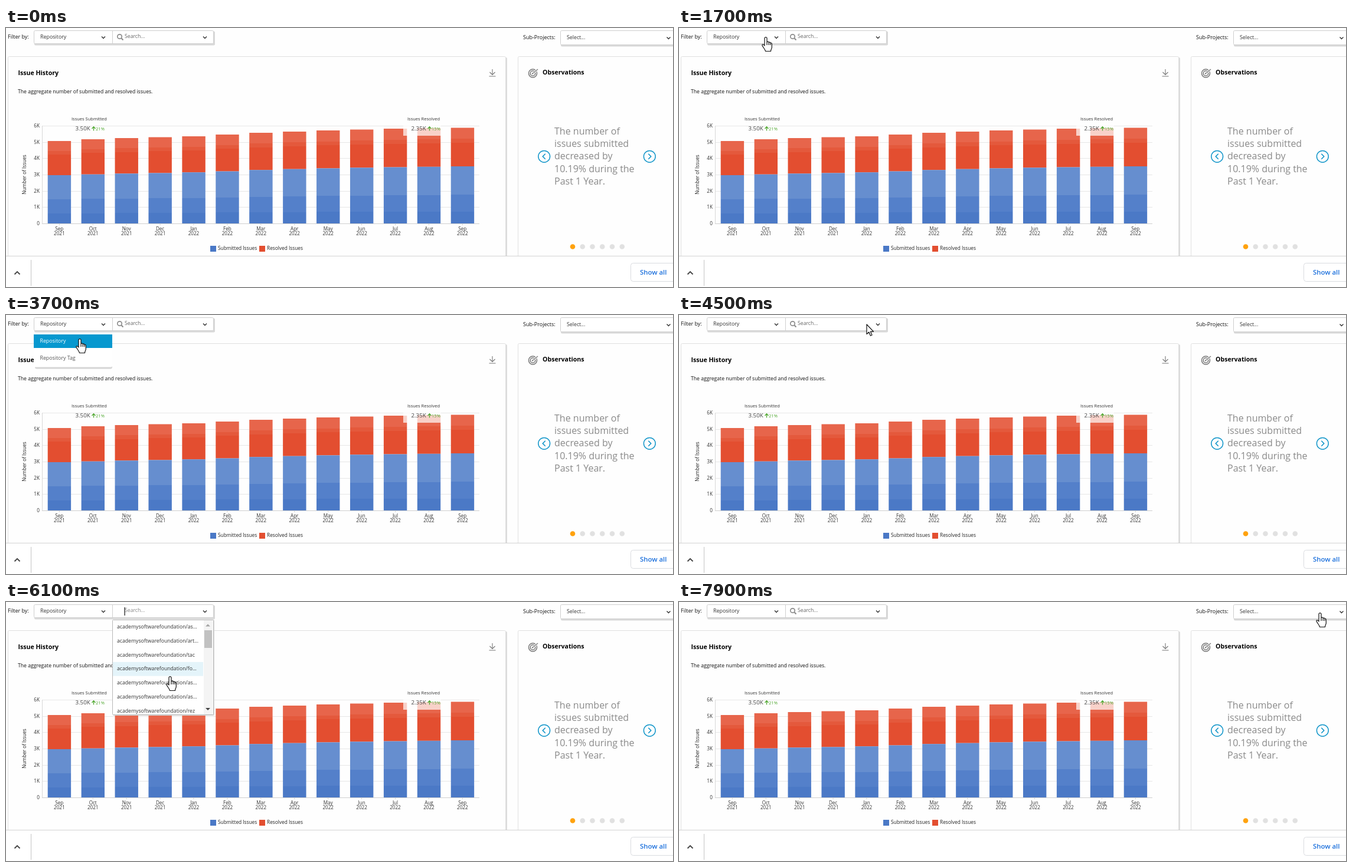
Write an HTML page that moves like this. It is 1130 px wide and 440 px high and loops after 8000 ms.

```html
<!DOCTYPE html>
<html lang="en">
<head>
<meta charset="utf-8">
<title>Issue history dashboard</title>
<style>
  html, body { margin: 0; width: 100%; height: 100%; overflow: hidden; background: #fefefe; }
  svg { display: block; width: 1130px; height: 440px; font-family: "Open Sans", "Noto Sans", sans-serif; }
  text { white-space: pre; }
</style>
</head>
<body>
<svg id="stage" viewBox="0 0 1130 440" xmlns="http://www.w3.org/2000/svg">
  <defs>
    <linearGradient id="red" x1="0" y1="0" x2="0" y2="1">
      <stop offset=".29" stop-color="#e7654b"/><stop offset=".29" stop-color="#e4593c"/>
      <stop offset=".39" stop-color="#e4593c"/><stop offset=".39" stop-color="#e34e30"/>
    </linearGradient>
    <linearGradient id="blue" x1="0" y1="0" x2="0" y2="1">
      <stop offset=".5" stop-color="#668ecf"/><stop offset=".5" stop-color="#5480ca"/>
      <stop offset=".79" stop-color="#5480ca"/><stop offset=".79" stop-color="#4b79c6"/>
    </linearGradient>
    <clipPath id="listClip"><rect x="181" y="31" width="170" height="159"/></clipPath>
  </defs>
</svg>
<script>
const NS = 'http://www.w3.org/2000/svg';
const stage = document.getElementById('stage');

function add(tag, attrs, parent = stage) {
  const el = document.createElementNS(NS, tag);
  for (const k in attrs) el.setAttribute(k, attrs[k]);
  parent.appendChild(el);
  return el;
}
const rect = (x, y, width, height, fill, more = {}, parent) =>
  add('rect', { x, y, width, height, fill, ...more }, parent);
const line = (d, stroke, width = 1, parent) =>
  add('path', { d, stroke, 'stroke-width': width, fill: 'none' }, parent);
const dot = (cx, cy, r, fill, more = {}, parent) => add('circle', { cx, cy, r, fill, ...more }, parent);
function label(str, x, y, size, fill, more = {}, parent) {
  const el = add('text', { x, y, 'font-size': size, fill, ...more }, parent);
  el.textContent = str;
  return el;
}
const chevron = (x, y, parent) => line(`M${x - 3} ${y - 1.5}l3 3 3-3`, '#333', 1.4, parent);
const show = (el, on) => el.setAttribute('display', on ? 'inline' : 'none');

function box(x, y, w, h) {
  rect(x + 1, y + 1.5, w + 1, h + 1, '#d9d9d9', { rx: 2 });
  rect(x + .5, y + .5, w - 1, h - 1, '#fff', { rx: 2, stroke: '#cfcfcf' });
}

// Cards
for (const [x, w] of [[3, 844], [867, 280]]) {
  rect(x + 2, 50, w, 360, '#dcdcdc', { rx: 2 });
  rect(x + .5, 48.5, w - 1, 360, '#fefefe', { rx: 2, stroke: '#e0e0e0' });
}

// Filter row
label('Filter by:', 3, 18, 9, '#111', { 'font-weight': 500 });
box(47, 4, 305, 23);
line('M180.5 5V27', '#cfcfcf');
label('Repository', 58, 18, 8.9, '#333');
chevron(165, 16);
chevron(337, 16);
const lens = add('g', {});
dot(192.5, 14.5, 3.7, 'none', { stroke: '#8c8c8c', 'stroke-width': 1.7 }, lens);
line('M195.3 17.3L198.5 20.5', '#8c8c8c', 2, lens);
const hint = label('Search...', 201, 17, 8.7, '#666');
label('Sub-Projects:', 876, 19, 9, '#111', { 'font-weight': 500 });
box(939, 4, 205, 25);
label('Select...', 950, 19, 8.8, '#333');
chevron(1122.5, 17);

// Card headings
label('Issue History', 20.5, 80, 10.6, '#000', { 'font-weight': 700 });
label('The aggregate number of submitted and resolved issues.', 20, 111, 8.65, '#111');
line('M824 70V79M819.5 75l4.5 4.5 4.5-4.5M818.5 82H829.5', '#777', 1.1);
label('Observations', 909, 79, 10.6, '#000', { 'font-weight': 700 });
for (const r of [7, 4.2]) dot(892.5, 77, r, 'none', { stroke: '#777', 'stroke-width': 1.5 });
dot(892.5, 77, 1.6, '#777');
line('M892.5 77L901 70', '#fefefe', 3);
line('M892.5 77L901 70', '#777', 1.3);

// Chart
const BASE = 332, STEP = 27.7;
for (let i = 0; i <= 6; i++) {
  const y = BASE - i * STEP;
  line(`M61 ${Math.round(y) + .5}H802`, i ? '#e7e7e7' : '#cfcfcf');
  label(i ? i + 'K' : '0', 57, y + 3, 8.2, '#333', { 'text-anchor': 'end' });
}
line('M61.5 166V332', '#d8d8d8');
label('Number of Issues', 0, 0, 8.2, '#222', {
  transform: 'translate(33.5 249) rotate(-90)', 'text-anchor': 'middle', 'font-weight': 500 });

const months = 'Sep Oct Nov Dec Jan Feb Mar Apr May Jun Jul Aug Sep'.split(' ');
const tops = [192, 189, 187, 185.5, 184, 181, 178, 176, 174, 172.5, 171, 170, 169.5];
const mids = [250, 248.7, 247.3, 246.4, 245.2, 243.5, 241.2, 239.7, 238.4, 237.3, 236.5, 235.8, 235];
months.forEach((name, i) => {
  const x = 70.7 + i * 56.92, c = x + 19.6;
  rect(x, tops[i], 39.4, mids[i] - tops[i], 'url(#red)');
  rect(x, mids[i], 39.4, BASE - mids[i], 'url(#blue)');
  const mid = { 'text-anchor': 'middle' };
  label(name, c, 344, 8.1, '#333', mid);
  label(i < 4 ? '2021' : '2022', c, 352, 8.1, '#333', mid);
  line(`M${c} 332v3`, '#cfcfcf');
});

function stat(x, title, value, pct) {
  label(title, x, 156.5, 7.5, '#333');
  label(value, x + 6.5, 174, 9.7, '#444');
  line(`M${x + 37.5} 174.5V168M${x + 34.5} 171l3-3.2 3 3.2`, '#4ea72e', 1.3);
  label(pct, x + 41, 174, 7.6, '#4ea72e');
}
rect(673, 165, 64, 18, '#fff', { opacity: .7 });
stat(111, 'Issues Submitted', '3.50K', '21%');
stat(680, 'Issues Resolved', '2.35K', '15%');

rect(346, 370, 10, 10, '#4a78c6');
label('Submitted Issues', 359, 377.3, 8.3, '#222');
rect(429, 370, 10, 10, '#e34e30');
label('Resolved Issues', 442, 377.3, 8.3, '#222');

// Observation carousel
['The number of', 'issues submitted', 'decreased by', '10.19% during the', 'Past 1 Year.']
  .forEach((s, i) => label(s, 929, 180.7 + i * 21.35, 16, '#8a8a8a'));
for (const [x, d] of [[911.7, -1], [1090.3, 1]]) {
  dot(x, 218.3, 9.9, 'none', { stroke: '#1095c9', 'stroke-width': 1.5 });
  line(`M${x - 2 * d} 213.8l${4.4 * d} 4.5 ${-4.4 * d} 4.5`, '#1095c9', 1.6);
}
for (let i = 0; i < 6; i++) dot(960 + i * 16.75, 371.5, 4.3, i ? '#e1e1e1' : '#ffa20d');

// Bottom bar
rect(0, 387, 1130, 53, '#fff');
line('M0 387.5H1130', '#d2d2d2');
line('M14.5 418.5l4.5-4.5 4.5 4.5', '#444', 1.8);
line('M42.5 394V438', '#c4c4c4');
rect(1058.5, 399.5, 90, 31, '#fff', { rx: 4, stroke: '#dadce0' });
label('Show all', 1074, 419, 11.4, '#1a6fdc', { 'font-weight': 600 });

// Repository menu
const menu = add('g', {});
rect(49, 35, 131, 56.5, '#d6d6d6', { rx: 3 }, menu);
rect(47, 33, 133, 55.5, '#fff', { rx: 2 }, menu);
rect(47, 33, 133, 23, '#0798cf', {}, menu);
const tagRow = rect(47, 61, 133, 23, '#e5f5fa', {}, menu);
label('Repository', 57.5, 47, 8.8, '#fff', {}, menu);
label('Repository Tag', 57.5, 76, 8.8, '#555', {}, menu);

// Search list
const ROW = 23.8;
const list = add('g', {});
rect(181, 30, 172, 163, '#d8d8d8', { rx: 2 }, list);
rect(180.5, 30.5, 171, 161, '#fff', { rx: 1, stroke: '#b9b9b9' }, list);
const rows = add('g', { 'clip-path': 'url(#listClip)' }, list);
const hover = rect(181, 0, 153, ROW, '#e4f4fa', {}, rows);
['as...', 'art...', 'tac', 'fo...', 'as...', 'as...', 'rez'].forEach((s, i) =>
  label('academysoftwarefoundation/' + s, 188, 45 + i * ROW, 8.7, '#333', {}, rows));
rect(335, 31, 15, 160, '#f4f4f4', {}, list);
rect(336, 48, 13, 30, '#c1c1c1', {}, list);
add('path', { d: 'M338 41.5h8l-4-4z', fill: '#a3a3a3' }, list);
add('path', { d: 'M338 180h8l-4 4z', fill: '#444' }, list);
const caret = rect(200.5, 9, 1.2, 14, '#111');

// Pointer shapes, origin at the tip
const pen = { fill: '#fff', stroke: '#111', 'stroke-width': 1.2, 'stroke-linejoin': 'round' };
const arrow = add('path', { ...pen, d: 'M0 0V16.5L3.8 13 6.4 19.2 9 18 6.4 12.2H11.5Z' });
const hand = add('path', { ...pen, d: 'M-2 14V1.5C-2-1 2-1 2 1.5V8C3 6.6 5 7 5.2 8.6 6 7.6 8 8 8 9.7 ' +
  '8.8 9 10.3 9.4 10.3 11V17C10 20 8.5 20 8.5 23.5H-.5C-1 20-4.5 17.5-6 13.5-6.5 11.3-4 11-2 14Z' +
  'M2 8V13M5.2 9V13M8 10V13' });

// Pointer moves: first step, last step, x, y, hand?
const moves = [
  [200, 200, 1087, 209, 0], [300, 700, 300, 0, 0], [800, 800, 233, 85, 0],
  [1000, 1400, 40, 91, 0], [1500, 1500, 70, 17, 1], [1700, 1700, 147, 16, 1],
  [2500, 2800, 122, 40, 1], [3000, 3000, 120, 48, 1], [3100, 3100, 119, 58, 1],
  [3200, 3200, 118, 65, 1], [3400, 3400, 130, 16, 1], [3700, 3800, 120, 66, 1],
  [4200, 4200, 32, 90, 0], [4300, 4500, 318, 16, 0], [5200, 5200, 302, 22, 1],
  [5400, 6000, 278, 115, 1], [6100, 6100, 278, 127, 1], [6200, 6200, 277, 127, 1],
  [6300, 6400, 277, 157, 1], [6600, 6700, 273, 167, 1], [6900, 6900, 320, 155, 1],
  [7000, 7000, 372, 122, 1], [7100, 7200, 838, 60, 0], [7500, 7700, 1050, 24, 0],
  [7800, 7900, 1086, 19, 1]
];

function pointerAt(t) {
  let p = null;
  for (const [from, to, x, y, isHand] of moves) {
    if (t < from) break;
    const k = p ? Math.min(1, (t - from + 100) / (to - from + 100)) : 1;
    const o = p || { x, y };
    p = { x: o.x + (x - o.x) * k, y: o.y + (y - o.y) * k, isHand };
  }
  return p;
}

function draw(ms) {
  const t = Math.floor(ms / 100) * 100;
  const p = pointerAt(t);
  for (const el of [arrow, hand]) {
    show(el, p && (el === hand) === !!p.isHand);
    if (p) el.setAttribute('transform', `translate(${p.x} ${p.y})`);
  }

  show(menu, t >= 2300 && t < 4200);
  show(tagRow, p && t >= 3200 && p.y > 60);

  const open = t >= 5000 && t < 7500;
  show(list, open);
  show(lens, !open);
  hint.setAttribute('fill', open ? '#858585' : '#666');
  show(caret, open && (t < 5500 || (t >= 6000 && t < 6600) || t >= 7000));
  if (open) {
    const row = t >= 6400 ? 5 : Math.floor((p.y - 2 - 30.5) / ROW);
    show(hover, row >= 0);
    hover.setAttribute('y', 30.5 + row * ROW);
  }
}

function tick() {
  draw(performance.now() % 8000);
  requestAnimationFrame(tick);
}
tick();
</script>
</body>
</html>
```
